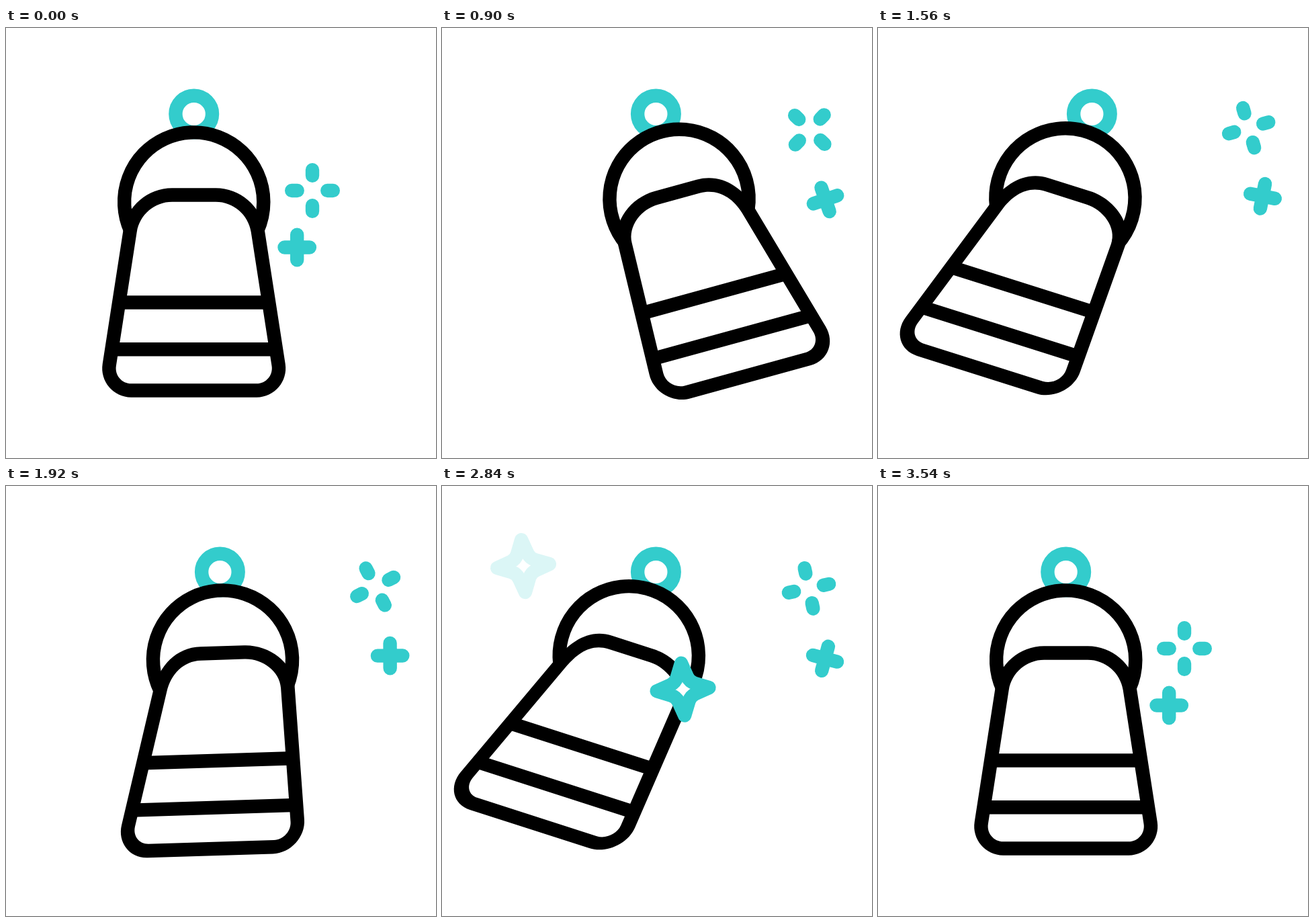
These frames come from a looping animation (640x640 px, 3600 ms). An HTML page with a canvas:

```html
<!DOCTYPE html>
<html>
<head>
<meta charset="utf-8">
<title>Swinging bell</title>
<style>
  html, body { margin: 0; width: 100%; height: 100%; overflow: hidden; background: #fff; }
  canvas { display: block; width: 640px; height: 640px; }
</style>
</head>
<body>
<canvas id="stage" width="640" height="640"></canvas>
<script>
const ctx = document.getElementById('stage').getContext('2d');
const LOOP = 3600;
const TEAL = '#33cccc';
const LINE = 20.4;
const BEND_Y = 178; // height at which the lean of the body is zero

const smooth = p => p * p * (3 - 2 * p);
const clamp = p => Math.min(1, Math.max(0, p));
const mix = (a, b, p) => a + (b - a) * p;
const linear = p => p;

// Value of a [time, value] key list at time t.
function track(keys, t, ease = smooth) {
  if (t <= keys[0][0]) return keys[0][1];
  for (let i = 1; i < keys.length; i++) {
    const [t0, v0] = keys[i - 1], [t1, v1] = keys[i];
    if (t < t1) return mix(v0, v1, ease((t - t0) / (t1 - t0)));
  }
  return keys[keys.length - 1][1];
}

// Rest, five alternating swings, rest.
function swingKeys(start, first, size) {
  const keys = [[start, 0]];
  for (let i = 0; i < 5; i++) keys.push([first + 600 * i, i % 2 ? -size : size]);
  return [...keys, [3510, 0]];
}

const ANGLE = swingKeys(0, 400, 18);
const LEAN = swingKeys(40, 506, 0.272);
const OUT = [[0, 0], [470, 1], [3060, 1], [3530, 0]];
const SPIN = [[0, 0], [460, 22], [900, 44], [1560, 74], [1710, 80], [2260, 35], [2840, -12], [3530, 0]];
const DRIFT = [[460, 0], [900, 0.22], [1560, 1], [1700, 1], [2260, 0.1], [2840, 0]];

function pen(color) {
  ctx.strokeStyle = color;
  ctx.lineWidth = LINE;
  ctx.lineJoin = 'round';
}

function at(x, y, degrees, draw) {
  ctx.save();
  ctx.translate(x, y);
  ctx.rotate(degrees * Math.PI / 180);
  draw();
  ctx.restore();
}

function strokeArc(x, y, r, from, to) {
  ctx.beginPath();
  ctx.arc(x, y, r, from, to);
  ctx.stroke();
}

// Adds the body contour, grown by d; the shoulders stay put while the rest leans.
function bodyContour(d, lean) {
  const nx = 0.988, ny = 0.155; // normal of the slanted side
  const R = 63.3 + d, r = 33 + d;
  const shoulder = 0.492 * R, foot = 0.615 * r;
  const top = 183.8 - R, bottom = 378.5 + r;
  const sideTop = [32.5 + nx * R, 183.8 - ny * R];
  const sideEnd = [93.3 + nx * r, 378.5 - ny * r];
  const half = [
    [32.5, top], [32.5 + shoulder, top],
    [sideTop[0] - ny * shoulder, sideTop[1] - nx * shoulder], sideTop,
    sideEnd, [sideEnd[0] + ny * foot, sideEnd[1] + nx * foot],
    [93.3 + foot, bottom], [93.3, bottom]
  ];
  const side = sign => half.map(([x, y], i) =>
    [sign * x - (i < 2 ? 0 : lean * (y - BEND_Y)), y]);
  const points = [...side(1), ...side(-1).reverse()];
  for (let i = 0; i < points.length; i += 4) {
    if (i) ctx.lineTo(...points[i]);
    else ctx.moveTo(...points[i]);
    ctx.bezierCurveTo(...points[i + 1], ...points[i + 2], ...points[i + 3]);
  }
  ctx.closePath();
}

// Drawn around the centre of the ring.
function drawBell(lean) {
  pen('#000');
  ctx.lineCap = 'butt';
  strokeArc(0, 131, 103.6, Math.PI - 0.428, 2 * Math.PI + 0.428);

  ctx.fillStyle = '#000';
  ctx.beginPath();
  bodyContour(LINE / 2, lean);
  bodyContour(-LINE / 2, lean);
  ctx.fill('evenodd');

  ctx.beginPath();
  for (const [half, y] of [[111.4, 280.5], [122.3, 350.3]]) {
    const x = -lean * (y - BEND_Y);
    ctx.moveTo(x - half, y);
    ctx.lineTo(x + half, y);
  }
  ctx.stroke();
}

// Four round-ended strokes reaching from one radius to another.
function drawRays(inner, outer) {
  pen(TEAL);
  ctx.lineCap = 'round';
  ctx.beginPath();
  for (const [x, y] of [[0, -1], [1, 0], [0, 1], [-1, 0]]) {
    ctx.moveTo(x * inner, y * inner);
    ctx.lineTo(x * outer, y * outer);
  }
  ctx.stroke();
}

// Four tips joined through rounded notches.
function drawStar() {
  const spot = (r, eighth) => {
    const a = eighth * Math.PI / 4;
    return [r * Math.sin(a), -r * Math.cos(a)];
  };
  ctx.beginPath();
  ctx.moveTo(...spot(39, 0));
  for (let i = 0; i < 8; i += 2) {
    const tip = spot(39, i + 2);
    ctx.arcTo(...spot(15, i + 1), ...tip, 18);
    ctx.lineTo(...tip);
  }
  ctx.closePath();
  ctx.fillStyle = '#fff';
  ctx.fill();
  pen(TEAL);
  ctx.stroke();
}

// A star that rises, rocks a little and fades away.
function risingStar(t, { start, from, to, side }) {
  const age = t - start, life = 880;
  if (age <= 0 || age >= life) return;
  const p = smooth(age / life);
  const tilt = side * 4.3 * Math.cos(2 * Math.PI * (age - 290) / 1160);
  ctx.globalAlpha = clamp(age / 100) * clamp((life - age) / 115);
  at(mix(from[0], to[0], p), mix(from[1], to[1], p), tilt, drawStar);
  ctx.globalAlpha = 1;
}

const STARS = [
  { start: 1980, from: [148, 293], to: [121, 118.8], side: 1 },
  { start: 2640, from: [354.7, 332], to: [384, 109], side: -1 }
];

function render(t) {
  const out = track(OUT, t);
  const spin = track(SPIN, t, linear);
  const drift = track(DRIFT, t, linear);
  const ringX = mix(279.7, 318.4, out);

  ctx.fillStyle = '#fff';
  ctx.fillRect(0, 0, 640, 640);

  pen(TEAL);
  strokeArc(ringX, 128, 27.3, 0, 2 * Math.PI);
  at(ringX, 128, track(ANGLE, t), () => drawBell(track(LEAN, t)));

  at(mix(456, 546, out) + 5.7 * drift, mix(242, 152.3, out) - 3.6 * drift,
    spin, () => drawRays(22.3, 30.8));
  at(mix(433.2, 570, out) + 2.5 * drift, mix(326.5, 256.8, out) - 6.5 * drift,
    spin + 27 * out, () => drawRays(0, 18.7));

  for (const star of STARS) risingStar(t, star);
}

let begin;
function tick(now) {
  if (begin === undefined) begin = now;
  render(Math.max(0, now - begin) % LOOP);
  requestAnimationFrame(tick);
}
render(0);
requestAnimationFrame(tick);
</script>
</body>
</html>
```
